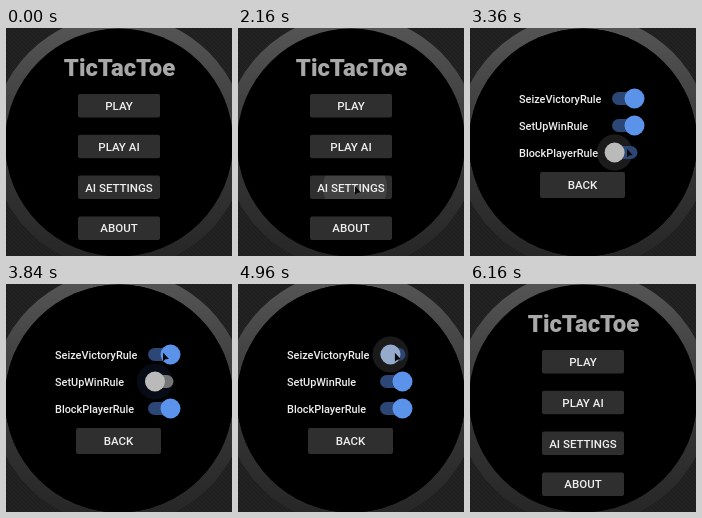
An HTML page with a canvas that plays this animation: 226x228 px, repeating every 6.64 s.

```html
<!DOCTYPE html>
<html lang="en">
<head>
<meta charset="utf-8">
<title>TicTacToe</title>
<style>
  html, body { margin: 0; width: 100%; height: 100%; overflow: hidden; background: #000; }
  canvas { display: block; }
</style>
</head>
<body>
<canvas width="226" height="228"></canvas>
<script>
const LOOP = 6640, STEP = 80;
const MENU = ['PLAY', 'PLAY AI', 'AI SETTINGS', 'ABOUT'];
const RULES = ['SeizeVictoryRule', 'SetUpWinRule', 'BlockPlayerRule'];
const OPEN = 2080, CLOSE = 5640;   // button presses that change the window
const ctx = document.querySelector('canvas').getContext('2d');

const rowY = row => 70.5 + 27 * row;
const clamp = v => Math.max(0, Math.min(1, v));
const ease = v => (1 - Math.cos(Math.PI * clamp(v))) / 2;
const mix = (a, b, k) => a + (b - a) * k;

// Switch clicks in order; every switch starts on
const clicks = [
  { at: 2970, row: 2 }, { at: 3340, row: 2 }, { at: 3670, row: 1 },
  { at: 3930, row: 0 }, { at: 4482, row: 1 }, { at: 4850, row: 0 }
];

// Pointer moves: it leaves at `at` and takes `span` to get to x, y
const moves = [
  { at: 100, span: 300, x: 142, y: 157 },
  { at: 740, span: 240, x: 207, y: 192 },
  { at: 1000, span: 360, x: 84, y: 158 },
  { at: 1540, span: 380, x: 117, y: 158 },
  ...clicks.map(({ row }, i) => ({ at: i ? clicks[i - 1].at : 2500, span: 120, x: 157, y: rowY(row) - 2 })),
  { at: 4940, span: 500, x: 130, y: 156 },
  { at: 5760, span: 400, x: 150, y: 236 }
];

function circle(x, y, r, fill) {
  ctx.beginPath();
  ctx.arc(x, y, r, 0, 7);
  ctx.fillStyle = fill;
  ctx.fill();
}

function box(x, y, w, h, r, fill) {
  ctx.beginPath();
  ctx.roundRect(x, y, w, h, r);
  ctx.fillStyle = fill;
  ctx.fill();
}

function text(str, x, y, font, fill, align = 'center') {
  ctx.font = font + ' Roboto, sans-serif';
  ctx.textAlign = align;
  ctx.fillStyle = fill;
  ctx.fillText(str, x, y);
}

function bezel() {
  ctx.fillStyle = '#201f20';
  ctx.fillRect(0, 0, 226, 228);
  ctx.strokeStyle = '#262526';
  ctx.lineWidth = 1;
  ctx.beginPath();
  for (let d = -228; d < 226; d += 4) {
    ctx.moveTo(d, 0);
    ctx.lineTo(d + 228, 228);
  }
  ctx.stroke();
  const shade = ctx.createLinearGradient(0, 0, 0, 228);
  shade.addColorStop(0, '#545454');
  shade.addColorStop(0.5, '#383838');
  shade.addColorStop(1, '#272727');
  circle(113, 114, 127, shade);
  circle(113, 114.5, 114, '#000');
}

function button(label, x, y, w, h, age = -1) {
  box(x, y, w, h, 2, '#2f2f2f');
  if (age >= 0) {
    ctx.save();
    ctx.clip();
    circle(x + w / 2 + 4, y + h / 2, age * 0.4, `rgba(255,255,255,${0.09 * clamp((500 - age) / 250)})`);
    ctx.restore();
  }
  text(label, x + w / 2, y + h / 2 + 4.2, 'condensed 500 11.5px', '#eee');
}

function menu(t) {
  text('TicTacToe', 113.5, 47.5, '900 23.9px', '#a8a8a8');
  MENU.forEach((label, i) => button(label, 72, 66 + i * 40.8, 82, 23.5, i === 2 && t < CLOSE ? t - OPEN : -1));
}

function toggle(label, row, t) {
  const y = rowY(row);
  const flips = clicks.filter(c => c.row === row).map(c => c.at);
  const past = flips.filter(at => at <= t);
  const next = flips[past.length] ?? Infinity;
  const age = t - (past.at(-1) ?? 0);
  const on = past.length % 2 === 0;
  const slide = ease(age / 250), tint = clamp((age - 80) / 80);
  const x = mix(144.3, 164.5, on ? slide : 1 - slide);
  const blue = on ? tint : 1 - tint;

  text(label, 49, y + 4.5, '500 10.9px', '#eee', 'left');
  const glow = past.length && age < 400 ? clamp((400 - age) / 300) : clamp((t - next + 80) / 80);
  const wasOn = age < 400 ? !on : on;
  circle(x, y, 18, wasOn ? `rgba(60,100,190,${0.15 * glow})` : `rgba(180,180,180,${0.15 * glow})`);
  box(142, y - 6.5, 25.5, 13, 6.5, on ? '#2c4675' : '#757575');
  circle(x, y, 10, `rgb(${mix(186, 91, blue)},${mix(186, 147, blue)},${mix(186, 234, blue)})`);
}

function settings(t) {
  RULES.forEach((label, row) => toggle(label, row, t));
  button('BACK', 70, 144, 85, 26, t - CLOSE);
}

function pointer(t) {
  let x = 232, y = 240;
  for (const m of moves) {
    const k = ease((t - m.at) / m.span);
    x = mix(x, m.x, k);
    y = mix(y, m.y, k);
  }
  ctx.beginPath();
  ctx.moveTo(x, y);
  ctx.lineTo(x, y + 9);
  ctx.lineTo(x + 2.5, y + 6.8);
  ctx.lineTo(x + 6, y + 6.5);
  ctx.closePath();
  ctx.strokeStyle = 'rgba(255,255,255,.15)';
  ctx.lineWidth = 0.6;
  ctx.stroke();
  ctx.fillStyle = '#080808';
  ctx.fill();
}

function draw(t) {
  bezel();
  // The settings window fades and slides over the menu
  const shown = ease((t - OPEN - 220) / 350) - ease((t - CLOSE - 220) / 260);
  if (shown < 1) menu(t);
  if (shown > 0) {
    ctx.save();
    ctx.globalAlpha = shown;
    circle(113, 114.5, 114, '#000');
    ctx.translate(0, 18 * (1 - shown));
    settings(t);
    ctx.restore();
  }
  pointer(t);
}

function tick() {
  draw(Math.floor(performance.now() % LOOP / STEP) * STEP);
  requestAnimationFrame(tick);
}
tick();
</script>
</body>
</html>
```
